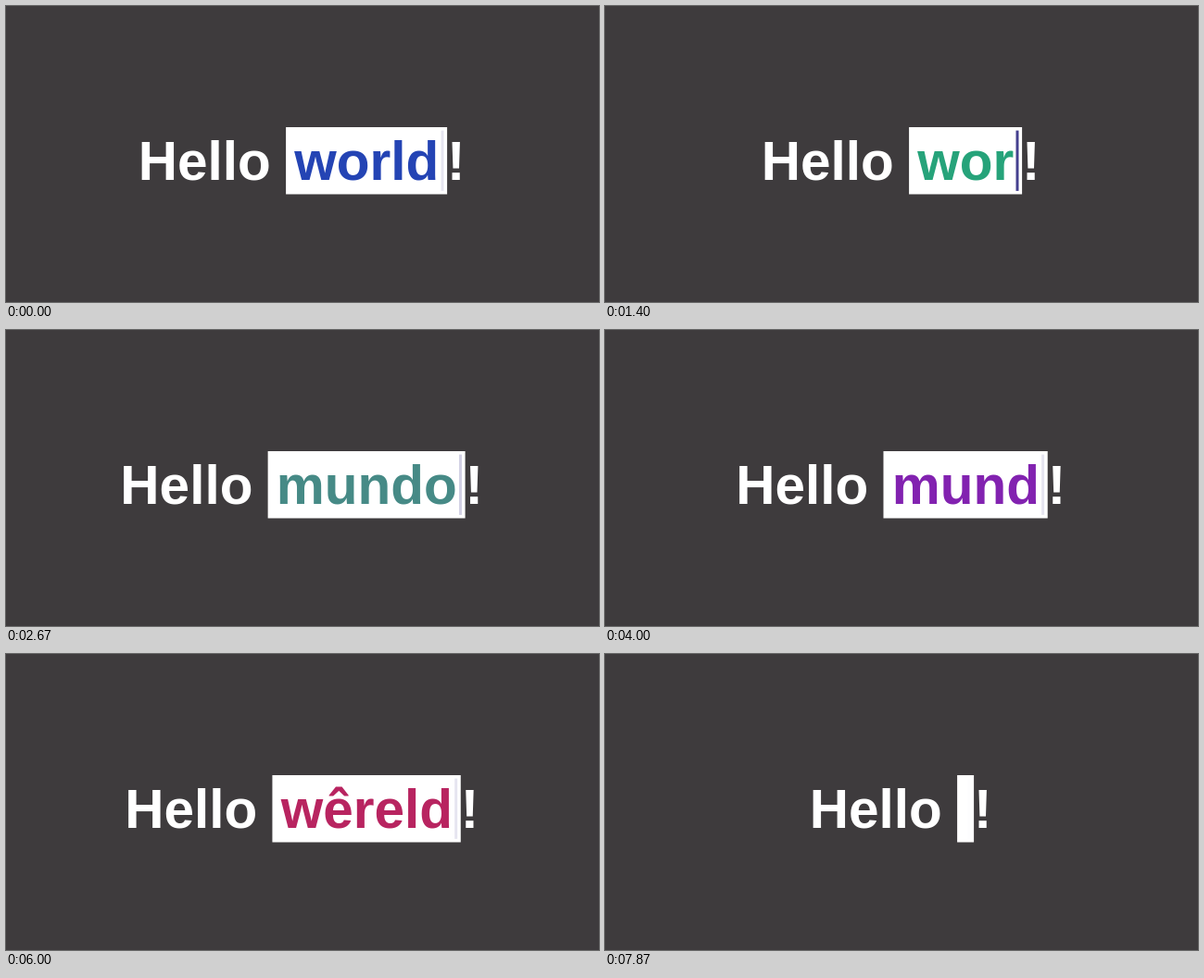
Animation, 640 px wide and 320 px high, one loop 8 s. Source, as an HTML page with a canvas:

```html
<!DOCTYPE html>
<html lang="en">
<head>
<meta charset="utf-8">
<title>Hello world</title>
<style>
  html, body { margin: 0; width: 100%; height: 100%; overflow: hidden; background: #3e3b3d; }
  canvas { display: block; width: 640px; height: 320px; }
</style>
</head>
<body>
<canvas id="stage"></canvas>
<script>
const LOOP = 8000;
const KEY_DELAY = 150;
const FONT_SIZE = 58.5;
const CENTER_X = 319.2;
const BASELINE = 187.5;
const BOX = { top: 131, height: 72.5, padLeft: 9.2, extra: 18 };
const CARET = { top: 134.6, height: 65.3, width: 3, gap: 2.2, color: [69, 64, 143] };

const words = [
  { text: 'world', typeAt: -2000, eraseAt: 1150 },
  { text: 'mundo', typeAt: 1990, eraseAt: 3990 },
  { text: 'wêreld', typeAt: 4860, eraseAt: 7000 },
];

const textColors = [
  [0, [36, 68, 180]],
  [1400, [38, 163, 122]],
  [2150, [44, 160, 124]],
  [2670, [70, 138, 134]],
  [4000, [130, 34, 176]],
  [5000, [164, 34, 138]],
  [6000, [184, 36, 96]],
  [8000, [204, 42, 50]],
];

const canvas = document.getElementById('stage');
const ctx = canvas.getContext('2d');
const ratio = window.devicePixelRatio || 1;
canvas.width = 640 * ratio;
canvas.height = 320 * ratio;

const clamp = (v, lo, hi) => Math.min(hi, Math.max(lo, v));
const rgb = (c, alpha = 1) => `rgba(${c.map(Math.round).join(',')},${alpha})`;

// CSS "ease": cubic-bezier(.25, .1, .25, 1), solved by bisection
function ease(x) {
  const bezier = (a, b, u) => 3 * a * u * (1 - u) ** 2 + 3 * b * u * u * (1 - u) + u ** 3;
  let lo = 0, hi = 1;
  for (let i = 0; i < 20; i++) {
    const mid = (lo + hi) / 2;
    if (bezier(0.25, 0.25, mid) < x) lo = mid; else hi = mid;
  }
  return bezier(0.1, 1, lo);
}

function textColor(t) {
  const next = textColors.findIndex(([time]) => time > t);
  const [t0, from] = textColors[next - 1];
  const [t1, to] = textColors[next];
  const k = (t - t0) / (t1 - t0);
  return from.map((v, i) => v + (to[i] - v) * k);
}

function typedText(t) {
  const word = words.filter(w => t >= w.typeAt).pop();
  const keys = since => t < since ? 0 : Math.floor((t - since) / KEY_DELAY) + 1;
  const size = word.text.length;
  const typed = Math.min(size, keys(word.typeAt));
  return word.text.slice(0, clamp(typed - keys(word.eraseAt), 0, size));
}

function caretAlpha(t) {
  const phase = (t / 1000 + 0.06) % 1;
  return phase < 0.5 ? ease(phase * 2) : 1 - ease(phase * 2 - 1);
}

function draw(t) {
  ctx.setTransform(ratio, 0, 0, ratio, 0, 0);
  ctx.fillStyle = '#3e3b3d';
  ctx.fillRect(0, 0, 640, 320);

  ctx.font = `bold ${FONT_SIZE}px "Liberation Sans", Arial, sans-serif`;
  ctx.fontKerning = 'none';
  ctx.textBaseline = 'alphabetic';
  const widthOf = s => ctx.measureText(s).width;

  const text = typedText(t);
  const textWidth = widthOf(text);
  const helloWidth = widthOf('Hello ');
  const boxWidth = textWidth + BOX.extra;
  const left = CENTER_X - (helloWidth + boxWidth + widthOf('!')) / 2;
  const boxLeft = left + helloWidth;
  const textLeft = boxLeft + BOX.padLeft;

  ctx.fillStyle = '#fff';
  ctx.fillText('Hello ', left, BASELINE);
  ctx.fillText('!', boxLeft + boxWidth, BASELINE);
  ctx.fillRect(boxLeft, BOX.top, boxWidth, BOX.height);

  ctx.fillStyle = rgb(textColor(t));
  ctx.fillText(text, textLeft, BASELINE);

  ctx.fillStyle = rgb(CARET.color, caretAlpha(t));
  ctx.fillRect(textLeft + textWidth + CARET.gap, CARET.top, CARET.width, CARET.height);
}

const start = performance.now();
function tick() {
  draw((performance.now() - start) % LOOP);
  requestAnimationFrame(tick);
}
tick();
</script>
</body>
</html>
```
